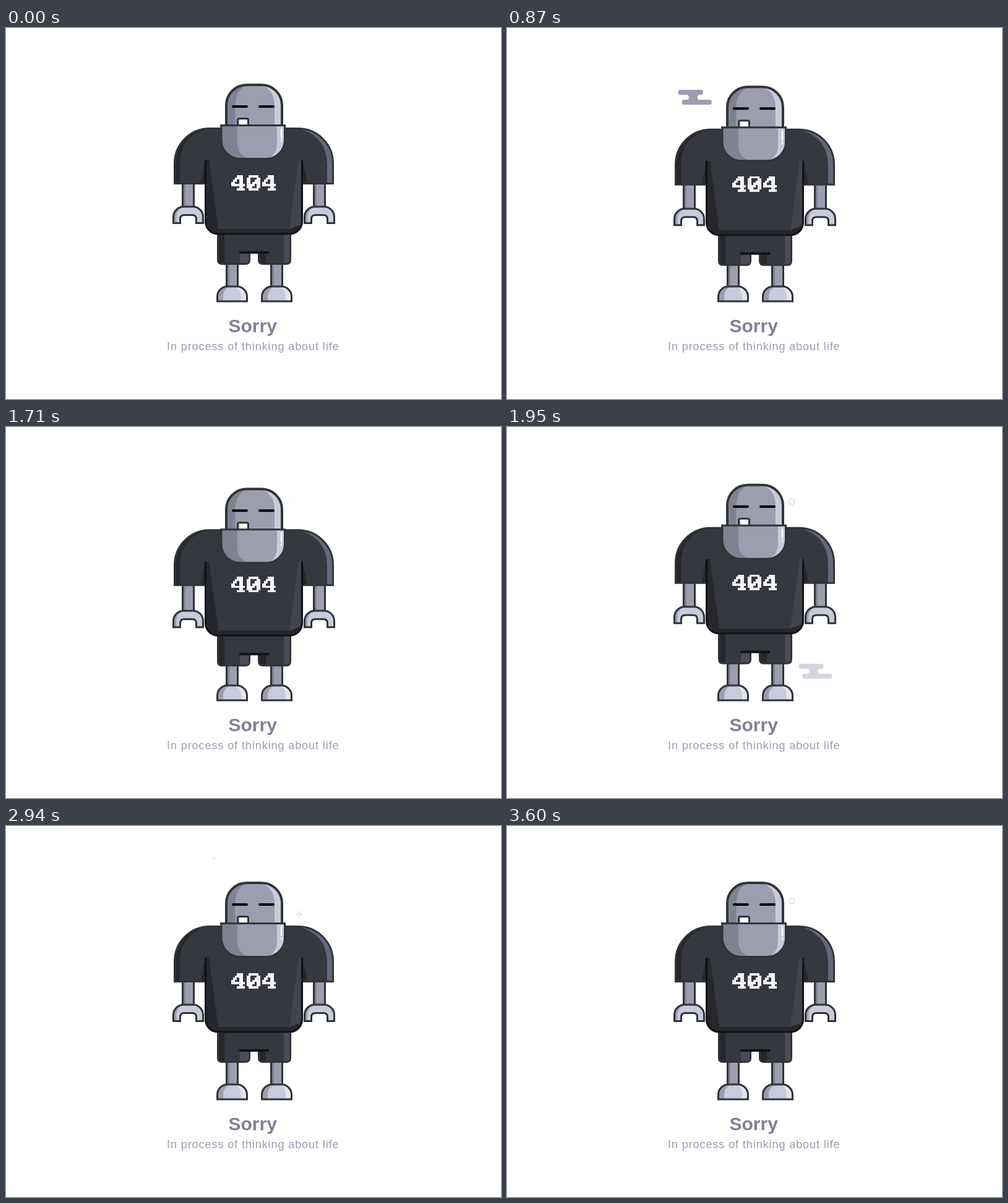
Write an HTML page that moves like this. It is 800 px wide and 600 px high and loops after 3.63 s.

```html
<!DOCTYPE html>
<html lang="en">
<head>
<meta charset="utf-8">
<title>Sorry</title>
<style>
  html, body { margin: 0; width: 100%; height: 100%; overflow: hidden; background: #fff; }
  svg { display: block; }
  text { font-family: "Liberation Sans", Arial, sans-serif; }
  .line { fill: none; stroke: #333336; stroke-width: 3; }
  .ink { stroke: #111214; }
  .steel { fill: #9c9eb0; }
  .shade { fill: #7f8291; }
  .shine { fill: #c8cbdb; }
  .cloth { fill: #36383f; }
  .dark { fill: #26272c; }
</style>
</head>
<body>
<svg width="800" height="600" viewBox="0 0 800 600">
  <defs>
    <g id="leg">
      <path class="steel" d="M356.5 370h18v50h-18z"/>
      <path class="shade" d="M357 370h4v50h-4z"/>
      <path class="line" d="M356.5 370v50M374.5 370v50"/>
      <path class="shine" d="M341.5 442V434.5A16.5 16.5 0 0 1 358 418H373A16.5 16.5 0 0 1 389.5 434.5V442Z"/>
      <path class="steel" d="M341.5 442V434.5A16.5 16.5 0 0 1 358 418H363Q351 422 351 435V442Z"/>
      <path fill="#e3e5ee" d="M389.5 442V434.5A16.5 16.5 0 0 0 373 418H369Q380 422 380 435V442Z"/>
      <path class="line" d="M341.5 442V434.5A16.5 16.5 0 0 1 358 418H373A16.5 16.5 0 0 1 389.5 434.5V442Z"/>
    </g>
    <g id="arm">
      <path class="steel" d="M285.5 235h18v56h-18z"/>
      <path class="shade" d="M286 235h4v56h-4z"/>
      <path class="line" d="M285.5 235v56M303.5 235v56"/>
      <path id="claw" class="shine" d="M270.5 315.5V305.5A16.5 16.5 0 0 1 287 289H302A16.5 16.5 0 0 1 318.5 305.5V315.5H307.5V309Q307.5 302.5 301 302.5H288Q281.5 302.5 281.5 309V315.5Z"/>
      <path class="steel" d="M270.5 315.5V305.5A16.5 16.5 0 0 1 287 289H290Q275.5 292 275.5 306V315.5Z"/>
      <path class="line" d="M270.5 315.5V305.5A16.5 16.5 0 0 1 287 289H302A16.5 16.5 0 0 1 318.5 305.5V315.5H307.5V309Q307.5 302.5 301 302.5H288Q281.5 302.5 281.5 309V315.5Z"/>
    </g>
    <g id="cloud" fill="#9c9eb0">
      <rect width="40" height="8" rx="3"/>
      <rect x="6" y="16" width="48" height="8" rx="3"/>
      <path d="M13 7.5Q17 8 17 12T13 16.5H35Q31 16 31 12T35 7.5Z"/>
    </g>
    <path id="plus" d="M-4 0H4M0-4V4" stroke="#9c9eb0" stroke-width="4" stroke-linecap="round"/>
    <circle id="ring" r="4.5" fill="none" stroke="#9c9eb0" stroke-width="2.5"/>
    <circle id="dot" r="2.5" fill="#9c9eb0"/>
  </defs>

  <g id="sky"></g>

  <use href="#leg"/>
  <use href="#leg" x="72"/>

  <g class="limbs">
    <use href="#arm"/>
    <use href="#arm" x="212"/>
  </g>

  <g class="trunk">
    <!-- shorts -->
    <path class="cloth" d="M342.5 325V375Q342.5 381.5 349 381.5H387Q393.5 381.5 393.5 375V363H408.5V375Q408.5 381.5 415 381.5H453Q459.500 381.5 459.500 375V325Z"/>
    <path class="dark" d="M343 325H353V381H349Q343 381 343 375ZM409 364H420V381H415Q409 381 409 375Z"/>
    <path fill="#4a4c59" d="M449.500 325H459V375Q459 381 453 381H449.500ZM378 364H393V375Q393 381 387 381H378Z"/>
    <path class="line" d="M342.5 325V375Q342.5 381.5 349 381.5H387Q393.5 381.5 393.5 375V363M408.5 363V375Q408.5 381.5 415 381.5H453Q459.500 381.5 459.500 375V325"/>
    <path class="line ink" d="M377 363H425" style="stroke-width:4"/>

    <!-- shoulders and sleeves -->
    <path class="cloth" d="M272.5 251.5V219A56.500 56.500 0 0 1 329 162.5H472A56.500 56.500 0 0 1 528.5 219V251.5Z"/>
    <path class="dark" d="M272.5 251.5V219A56.500 56.500 0 0 1 329 162.5Q281 172 281 222V251.5ZM322 212L315 251.5H323ZM479 212L487 251.5H478Z"/>
    <path fill="#65687c" d="M528.5 251.5V219A56.500 56.500 0 0 0 472 162.5Q519 174 519 222V251.5Z"/>
    <path class="line" d="M272.5 251.5V219A56.500 56.500 0 0 1 329 162.5H472A56.500 56.500 0 0 1 528.5 219V251.5Z"/>

    <!-- torso -->
    <path class="cloth" d="M322.5 213V313A20 20 0 0 0 342.5 333H458.5A20 20 0 0 0 478.5 313V213Z"/>
    <path fill="#43434e" d="M473 213H478V313L470 327L458 325Z"/>
    <path class="dark" d="M323 213H328L343 325H458L477 318A20 20 0 0 1 458.5 333H342.5A20 20 0 0 1 323 313Z"/>
    <path class="line ink" d="M322.5 213V313A20 20 0 0 0 342.5 333H458.5A20 20 0 0 0 478.5 313V213"/>
    <path id="digits" fill="#f4f4f8" shape-rendering="crispEdges"/>
  </g>

  <g class="limbs">
    <!-- skull -->
    <path class="steel" d="M356 158V125A33 33 0 0 1 389 92H413A33 33 0 0 1 446 125V158Z"/>
    <path class="shade" d="M356 158V125A33 33 0 0 1 389 92H392Q370.500 98 370.500 126V158Z"/>
    <path class="shine" d="M446 158V125A33 33 0 0 0 413 92H410Q434 98 434 126V158Z"/>
    <path class="line" style="stroke-width:4" d="M356 158V125A33 33 0 0 1 389 92H413A33 33 0 0 1 446 125V158"/>
    <path d="M367 127H389M410 127H432" stroke="#000" stroke-width="4" stroke-linecap="round"/>
    <path fill="#fff" stroke="#333336" stroke-width="3" d="M374.5 158V149Q374.5 146.500 377 146.500H389Q391.500 146.500 391.500 149V158"/>
    <path class="shine" d="M376 148h2v9h-2z"/>

    <!-- jaw -->
    <path class="steel" d="M348 157.5H450.5V181A30.500 30.500 0 0 1 420 211.5H378.500A30.500 30.500 0 0 1 348 181Z"/>
    <path class="shade" d="M348 157.5H374V186Q374 207 394 211.5H378.500A30.500 30.500 0 0 1 348 181Z"/>
    <path class="shine" d="M450.500 157.500H438V186Q438 206 421 211.500A30.500 30.500 0 0 0 450.500 181Z"/>
    <path class="line" d="M348 157.5V181A30.500 30.500 0 0 0 378.500 211.500H420A30.500 30.500 0 0 0 450.500 181V157.5M346 157.500H452"/>
    <path d="M445 162.500V178M445 180.500V184" stroke="#fff" stroke-width="2"/>
  </g>

  <text x="359.500" y="492" font-size="30" font-weight="bold" fill="#7f8194">Sorry</text>
  <text x="260" y="521" font-size="18" letter-spacing=".92" fill="#9a9cb0">In process of thinking about life</text>
</svg>

<script>
const LOOP = 3630, STEP = 30, BOB = 750;
const $ = selector => document.querySelectorAll(selector);
const clamp = v => Math.max(0, Math.min(1, v));

// Bitmap digits: one byte per row, high bit on the left
const FOUR = [0x1c, 0x3c, 0x6c, 0xcc, 0xfe, 0x0c, 0x1e];
const ZERO = [0x7c, 0xc6, 0xce, 0xde, 0xf6, 0xe6, 0x7c];
const CELL_W = 3.13, CELL_H = 3.57;
let cells = '';
[FOUR, ZERO, FOUR].forEach((rows, i) => rows.forEach((bits, y) => {
  for (let x = 0; x < 8; x++) {
    if (bits & (128 >> x)) {
      cells += `M${364 + (i * 8 + x) * CELL_W} ${238 + y * CELL_H}h${CELL_W}v${CELL_H}h-${CELL_W}z`;
    }
  }
}));
$('#digits')[0].setAttribute('d', cells);

function addShape(id) {
  const node = document.createElementNS('http://www.w3.org/2000/svg', 'use');
  node.setAttribute('href', '#' + id);
  $('#sky')[0].append(node);
  return node;
}

// Clouds drift right while fading in, holding and fading out
const clouds = [[254.2, 100, 265], [466.4, 383, 1818]]
  .map(([x, y, start]) => ({ node: addShape('cloud'), x, y, start }));

// Sparks stay in place and pulse: shape, x, y, middle time, peak opacity
const sparks = [
  ['plus', 452, 72, 420, .27],
  ['dot', 336, 52, 1170, .12],
  ['ring', 460, 121, 1930, .25],
  ['plus', 345, 98, 2300, .16],
  ['dot', 336, 52, 2940, .16],
  ['plus', 474, 143, 2980, .17],
  ['ring', 460, 121, 3600, .22]
].map(([id, x, y, mid, peak]) => ({ node: addShape(id), x, y, mid, peak }));

function place(node, x, y, opacity = 1) {
  node.setAttribute('transform', `translate(${x} ${y})`);
  node.setAttribute('opacity', opacity);
}

function draw(now) {
  const t = Math.floor(now % LOOP / STEP) * STEP;

  // Linear dip and return, then a rest
  const dip = 11.5 * Math.max(0, 1 - Math.abs(t % BOB - 270) / 210);
  $('.limbs').forEach(g => place(g, 0, dip));
  $('.trunk').forEach(g => place(g, 0, dip * .52));

  for (const { node, x, y, start } of clouds) {
    const age = t - start;
    place(node, x + age * .0373, y, clamp(Math.min(age, 945 - age) / 315));
  }
  for (const { node, x, y, mid, peak } of sparks) {
    const u = clamp((t - mid) / 600 + .5);
    place(node, x, y, peak * Math.sin(Math.PI * u) ** 2);
  }
  requestAnimationFrame(() => draw(performance.now() - began));
}

const began = performance.now();
draw(0);
</script>
</body>
</html>
```
